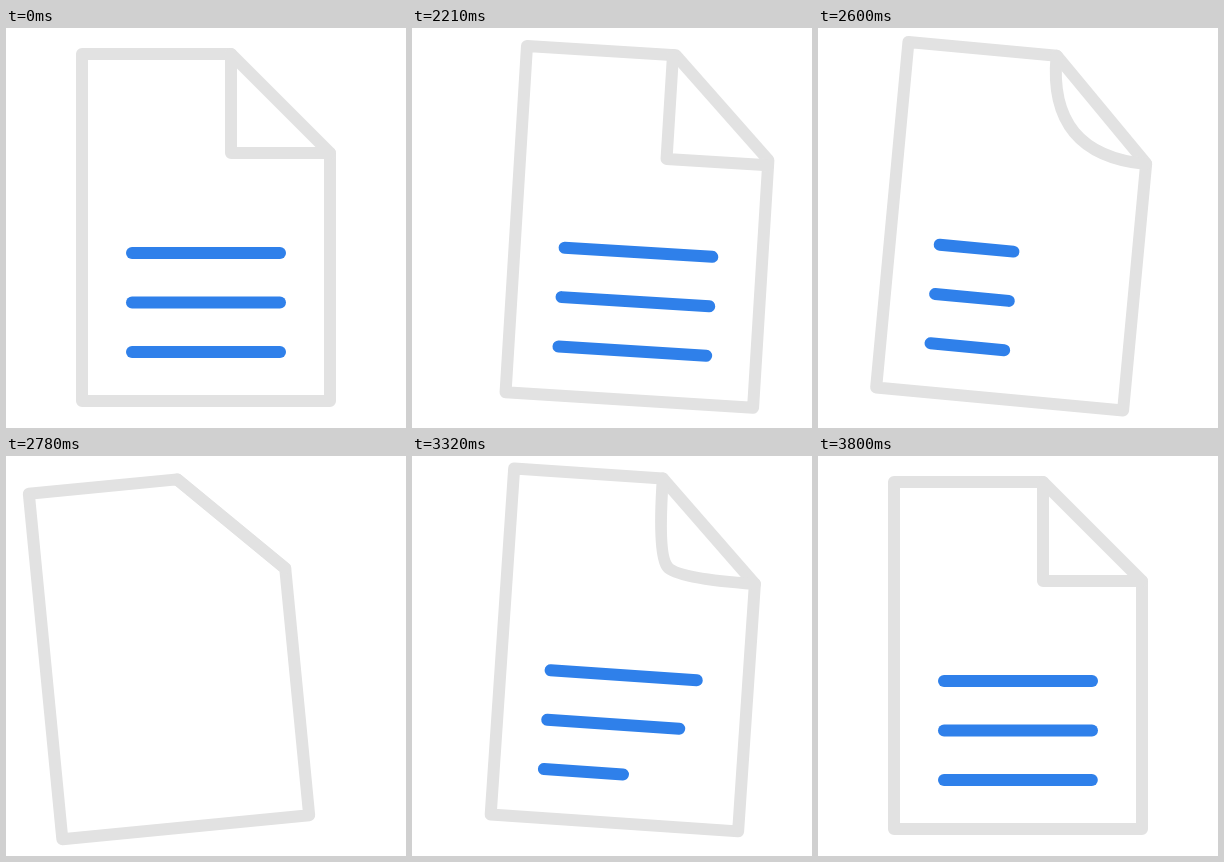
Recreate the animation shown at these times as an HTML page. Size 400x400 px, loop 3830 ms.

```html
<!DOCTYPE html>
<html lang="en">
<head>
<meta charset="utf-8">
<title>Document swing</title>
<style>
  html, body { margin: 0; width: 100%; height: 100%; overflow: hidden; background: #fff; }
  svg { display: block; width: 100vw; height: 100vh; }
</style>
</head>
<body>
<svg viewBox="0 0 400 400" fill="none" stroke-width="12" stroke-linecap="round" stroke-linejoin="round">
  <g id="page" stroke="#e2e2e2">
    <path d="M76 26H225L324 125V373H76Z"/>
    <path id="fold"/>
    <g id="lines" stroke="#2f80ea"><path/><path/><path/></g>
  </g>
</svg>
<script>
const LOOP = 3830, START = 2030, STEP = 30;
const page = document.getElementById('page');
const fold = document.getElementById('fold');
const lines = [...document.getElementById('lines').children];

const lerp = (a, b, p) => a + (b - a) * p;
const progress = (t, start, length) => Math.min(1, Math.max(0, (t - start) / length));
const easeInOut = p => (1 - Math.cos(Math.PI * p)) / 2;
const easeOut = (p, power) => 1 - (1 - p) ** power;

// Keys are [time, value] pairs, eased in and out between neighbours.
function track(keys, t) {
  let value = keys[0][1];
  for (let i = 1; i < keys.length; i++) {
    const [t0, v0] = keys[i - 1], [t1, v1] = keys[i];
    if (t >= t0) value = lerp(v0, v1, easeInOut(progress(t, t0, t1 - t0)));
  }
  return value;
}

const shiftX = [[2000, 0], [2410, 54], [2740, -37], [2880, -37], [3380, 16], [3800, 0]];
const shiftY = [[2000, 0], [2450, -1.5], [2780, -1], [3140, 1.2], [3400, -7.5], [3800, 0]];
const tilt = [[2000, 0], [2480, 8.8], [2880, -8], [3400, 4.6], [3800, 0]];
const stretch = [[2030, 0], [2450, 1], [2620, 0]];

// open = 0 lies flat on the diagonal, open = 1 is a sharp corner.
function foldPath(open, pull) {
  const x = 225 - 7 * pull, y = 125 + 13 * pull;
  const downY = lerp(26, y, open), leftX = lerp(324, x, open);
  return `M${x} 26Q${x} ${downY} ${(x + leftX) / 2} ${(downY + y) / 2}Q${leftX} ${y} 324 ${y}`;
}

function draw(t) {
  page.setAttribute('transform',
    `translate(${track(shiftX, t)} ${track(shiftY, t)}) rotate(${track(tilt, t)} 200 199.5)`);

  const open = t < 2760
    ? 1 - easeInOut(progress(t, 2450, 300))
    : easeOut(progress(t, 2918, 756), 2);
  fold.setAttribute('d', foldPath(open, track(stretch, t)));

  lines.forEach((line, i) => {
    const size = t < 2760
      ? 1 - easeInOut(progress(t, 2450, 300))
      : easeOut(progress(t, 2810 + 190 * i, 745), 4);
    line.setAttribute('d', size > 0 ? `M126 ${225 + 49.5 * i}h${148 * size}` : '');
  });
}

function tick() {
  const t = performance.now() % LOOP;
  draw(t < START ? 0 : START + Math.floor((t - START) / STEP) * STEP);
  requestAnimationFrame(tick);
}
tick();
</script>
</body>
</html>
```
